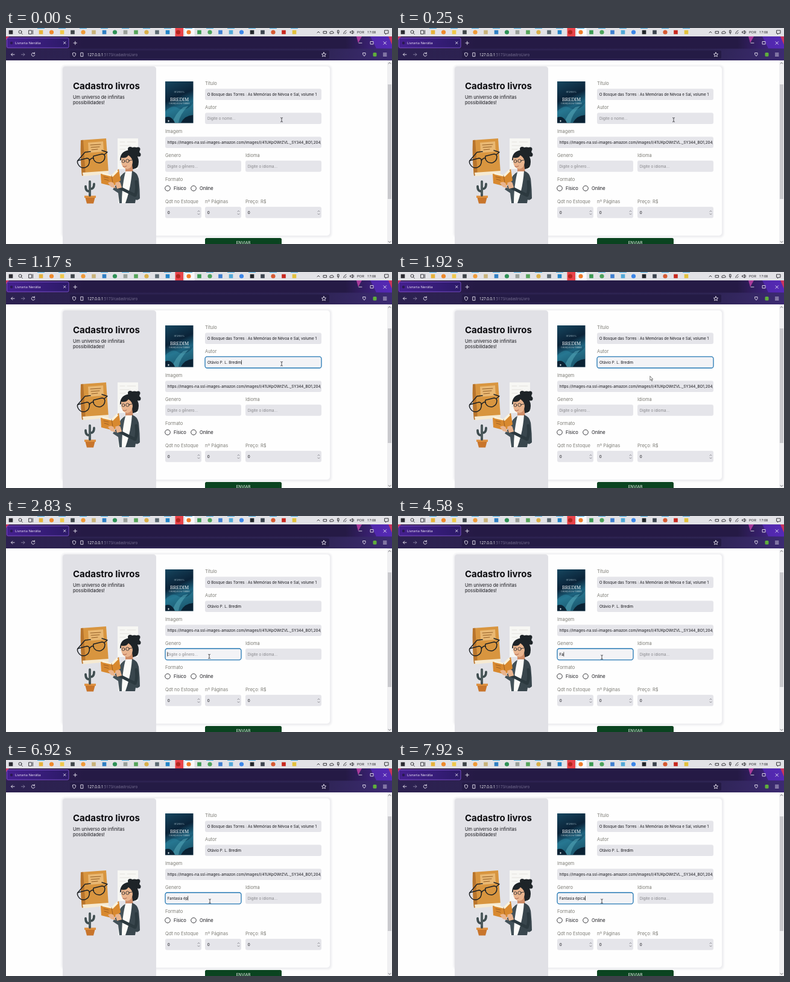
Write an HTML page that moves like this. It is 640 px wide and 360 px high and loops after 8000 ms.

```html
<!DOCTYPE html>
<html lang="pt">
<head>
<meta charset="utf-8">
<title>Cadastro livros</title>
<style>
html, body { margin: 0; width: 100%; height: 100%; overflow: hidden; background: #fefefe; }
svg { display: block; width: 640px; height: 360px; }
text { font-family: Inter, sans-serif; font-size: 6.25px; fill: #15151a; white-space: pre; }
.ui { font-family: "Open Sans", sans-serif; font-size: 6.1px; }
.label { font-size: 7.5px; fill: #7c7b74; }
.body { font-size: 7.5px; }
.hint { fill: #86868a; }
.box { fill: #e5e5ea; }
.line { fill: none; stroke-linecap: round; stroke-linejoin: round; }
</style>
</head>
<body>
<svg viewBox="0 0 640 360">
  <defs>
    <linearGradient id="tabs"><stop stop-color="#3a1d5c"/><stop offset=".2" stop-color="#251a45"/><stop offset=".88" stop-color="#251a45"/><stop offset="1" stop-color="#4a2596"/></linearGradient>
    <linearGradient id="tab"><stop stop-color="#45208f"/><stop offset="1" stop-color="#2c1a68"/></linearGradient>
    <linearGradient id="nav"><stop stop-color="#2c2150"/><stop offset=".8" stop-color="#2d2452"/><stop offset="1" stop-color="#3c2a72"/></linearGradient>
    <linearGradient id="cover" x2=".3" y2="1"><stop stop-color="#16465f"/><stop offset=".45" stop-color="#0b2338"/><stop offset=".7" stop-color="#1d6480"/><stop offset="1" stop-color="#0a2b40"/></linearGradient>
    <filter id="soft" x="-10%" y="-10%" width="120%" height="120%"><feGaussianBlur stdDeviation="1.8"/></filter>
  </defs>

  <!-- page -->
  <rect width="640" height="360" fill="#fefefe"/>
  <rect x="92" y="62" width="448" height="287" rx="6" fill="#ededf0" filter="url(#soft)"/>
  <rect x="94" y="64" width="443" height="282" rx="5" fill="#fefefe"/>
  <path d="M94 360V69q0-5 5-5H244q5 0 5 5V360Z" fill="#e1e1e6"/>
  <text x="111" y="101.8" style="font-size:15px;font-weight:700;fill:#0c0c10">Cadastro livros</text>
  <text class="body" x="111" y="117.6">Um universo de infinitas</text>
  <text class="body" x="111" y="126.8">possibilidades!</text>

  <!-- reader -->
  <g id="art">
    <path d="M185 184h34v51h-34Z" fill="#f7f7f4"/>
    <path class="line" d="M189 190h8m4 0h14m-26 6h18m-18 6h9m-9 22h6" stroke="#e2e0dc" stroke-width="1"/>
    <path d="M124 187l42-3 4 58-44 4q-3-28-2-59Z" fill="#d8953f"/>
    <path d="M124 187l4-.3 4 59-6 .5q-3-28-2-59Z" fill="#b8742c"/>
    <path d="M127 241l43-3v5l-42 4Z" fill="#f6ead2"/>
    <path d="M136 191l25-2 1 17-25 2Z" fill="#e9b873"/>
    <path class="line" d="M140 195l17-1m-16 5l14-1m-13 5l10-1" stroke="#8f5a24" stroke-width="1"/>
    <g class="line" stroke="#1c2024" stroke-width="1.5">
      <path d="M119 221l15-4q4 0 4.500 4 0 9-7 11.500-8 2-12-5.500-2-4-.5-6ZM145 213.500l14-3.500q4 0 5 4 0 8-7 10.500-8 1.500-11.500-5-1.500-4-.5-6Z"/>
      <path d="M138 221q4-5 7-4M119 221l12-14 9-1M163 211l5-4-9-3"/>
    </g>
    <path d="M131 281h17l-3 11.500h-11Z" fill="#c8752c"/>
    <path d="M130 279.500h19v3.500h-19Z" fill="#dd8f3e"/>
    <path class="line" d="M139 279v-23M139 272q-7 1-7-8M139 268q7 1 7-8" stroke="#3f4d50" stroke-width="3.800"/>
    <path class="line" d="M139 277v-20" stroke="#6d7b7c" stroke-width=".7"/>
    <!-- hair, head -->
    <g fill="#1e2428">
      <circle cx="213" cy="207" r="8.500"/><circle cx="206" cy="202" r="4"/><circle cx="219" cy="202" r="3.500"/><circle cx="220" cy="211" r="3.500"/>
      <path d="M189 221q0-14 12-17 14-1 17 10 4 9 0 18-7 6-14 1l-9-16Z"/>
    </g>
    <path d="M198 229l11-2 2 14q-7 7-13 0Z" fill="#cf8d68"/>
    <path d="M191 216q8 2 12-4 7 5 7 12-1 10-9 11-9-1-10-12Z" fill="#e9b48e"/>
    <g class="line" stroke="#1e2428" stroke-width=".8">
      <circle cx="194.500" cy="222" r="2.400"/><circle cx="201.500" cy="221.500" r="2.700"/><path d="M204 221l5-1"/>
      <path d="M194 230.500q3 2 6-.5" stroke="#9b4e3d"/>
    </g>
    <!-- clothes, open book -->
    <path d="M188 246l11-7 12 0 5 15-4 38h-26Z" fill="#fbfbf8"/>
    <path d="M209 238q9 3 11 13 2 17 2 33-4 4-7 2l-1 6h-16q9-25 11-54Z" fill="#39464d"/>
    <path d="M198 240q-9 4-11 15l-10 14 9 6 2 17h4q0-28 6-52Z" fill="#435158"/>
    <path class="line" d="M216 256q2 16-2 23l-26-13" stroke="#2c393f" stroke-width="5"/>
    <path d="M157 243l18 3 12-11 3 19-12 10-20-5Z" fill="#d8892f"/>
    <path d="M160 241l15 4 9-9 2 3-9 9-17-4Z" fill="#faf2dc"/>
    <path class="line" d="M175 246l3 17M162 248l8 2m-7 2l7 2" stroke="#8f5420" stroke-width=".8"/>
    <path d="M181 258q8-4 9 1l2 7-8 2ZM169 258q5-3 9 0l4 9-8-2Z" fill="#e9b48e"/>
  </g>

  <!-- book cover -->
  <g>
    <rect x="264" y="89" width="46.500" height="69.500" fill="url(#cover)"/>
    <path d="M264 139q12-13 22-5 14 6 24-9v33h-46Z" fill="#2f87a0" opacity=".55"/>
    <path d="M276 158q4-15 18-26l8-2q-14 14-16 28Z" fill="#5cb0c0" opacity=".5"/>
    <path d="M264 149q10-4 16 9h-16ZM290 158q6-12 20-13v13Z" fill="#0a2234"/>
    <g text-anchor="middle">
      <text x="287.500" y="107.800" style="font:3px 'Liberation Serif',serif;fill:#b9d0da">OTÁVIO P. L.</text>
      <text x="287.500" y="122" style="font:8px 'Liberation Serif',serif;fill:#f6f8fa">BREDIM</text>
      <text x="287.500" y="127.200" style="font:3px 'Liberation Serif',serif;fill:#d5e0e6">O BOSQUE DAS TORRES</text>
    </g>
    <path d="M268 155h3m-1.500-1.500v3" stroke="#dfe8ec" stroke-width=".9"/>
  </g>

  <g id="form"></g>
  <rect x="330" y="350" width="127" height="20" rx="2.500" fill="#0a4420"/>
  <text x="393.500" y="360.300" text-anchor="middle" style="font-size:6.5px;fill:#f2f4f0">ENVIAR</text>

  <!-- live parts -->
  <rect id="ring" height="18.800" rx="3.500" fill="#f3f3f6" stroke="#2277b4" stroke-width="1.300"/>
  <text id="author" x="334" y="153.200"></text>
  <text id="genre" x="267.500" y="233"></text>
  <rect id="caret" width=".7" height="7.500" fill="#111"/>

  <!-- scrollbar -->
  <rect x="632" y="54" width="8" height="306" fill="#f0f0f2"/>
  <rect x="633" y="94" width="6" height="191" fill="#c9c9cd"/>
  <path class="line" d="M634 59.500l2-2 2 2M634 355.500l2 2 2-2" stroke="#55555a" stroke-width=".9"/>

  <!-- browser -->
  <rect y="14" width="640" height="21" fill="url(#tabs)"/>
  <path d="M581 14h9l-6 11Z" fill="#a83a9a"/>
  <path d="M604 14h30l6 12v8h-26Z" fill="#5a2cc4" opacity=".7"/>
  <path d="M634 14h6v14ZM0 14h5l-5 6Z" fill="#c8355e"/>
  <rect y="34.500" width="640" height="19.500" fill="url(#nav)"/>
  <rect x="1.500" y="16.500" width="102.500" height="16.500" rx="2" fill="url(#tab)" stroke="#8a5be0" stroke-width=".8"/>
  <rect x="106" y="37.500" width="430" height="13.500" rx="2" fill="#241b45"/>
  <circle cx="9" cy="25" r="2.200" fill="#2a1a52"/>
  <text class="ui" x="15" y="27.200" style="fill:#f5f0fa">Livraria Nerália</text>
  <text class="ui" x="135" y="46.600" style="font-size:6.2px;fill:#fff">127.0.0.1<tspan fill="#7d7698">:5173/cadastroLivro</tspan></text>
  <g class="line" stroke="#ece8f4" stroke-width=".9">
    <path d="M95.500 23l3.500 3.500m0-3.500l-3.500 3.500M112 25h5.500m-2.750-2.750v5.500"/>
    <path d="M14 44.200H8.500l2.300-2.300m-2.300 2.300l2.300 2.300"/>
    <path d="M25.500 44.200h5.500l-2.300-2.300m2.300 2.300l-2.300 2.300" stroke="#8d86a6"/>
    <path d="M47.300 42.500a2.800 2.800 0 1 0 .5 2.500m-.4-4.200v2h-2"/>
    <path d="M113 41.300l2.700 1q0 4-2.700 5.500-2.700-1.500-2.700-5.500ZM124.200 41.300h3.600v6h-3.600Z"/>
    <path d="M527 40.700l1.100 2.300 2.500.3-1.800 1.800.5 2.500-2.300-1.200-2.300 1.200.5-2.500-1.800-1.800 2.500-.3Z"/>
    <path d="M585 25h5M604.500 22.500h4.500v4.500h-4.500ZM626 22.800l4.500 4.500m0-4.500l-4.500 4.500"/>
    <path d="M592 41.500h4v3l-2 2.500-2-2.500ZM625.500 42h5.500m-5.500 2.300h5.500m-5.500 2.300h5.500"/>
  </g>
  <rect x="608.500" y="41" width="6" height="6.500" rx="1.500" fill="#5fae3c"/>

  <!-- taskbar -->
  <rect width="640" height="14" fill="#e2e2e6"/>
  <rect x="280.500" width="13.500" height="14" fill="#e8434a"/>
  <rect x="296.500" width="16" height="14" fill="#fafafc"/>
  <g id="icons"></g>
  <g class="line" stroke="#26262b" stroke-width=".9">
    <circle cx="23.500" cy="6.500" r="2.500"/>
    <path d="M25.300 8.400l2 2M38 4h4.500v6H38ZM44.500 4v6"/>
    <path d="M516 8l2-2 2 2M526.500 5.500h5v3.500h-5ZM537 9q-1-3 2-3 2-2 4 1 1 2-1 2ZM550 4h2v4h-2ZM551 8v2M560 9.500q0-4 4-5M562.500 9.500l1.500-2M571 6h1.500l2-2v6l-2-2H571ZM576 5q1.500 2 0 4M628 4h6v5h-3l-1.500 1.500V9H628Z"/>
  </g>
  <text class="ui" x="582" y="9.200" style="font-size:5.9px">POR</text>
  <text class="ui" x="599" y="9.200" style="font-size:5.6px">17:08</text>

  <g id="beam" class="line" stroke="#2b2b30" stroke-width=".8"><path d="M-1.500-3.500q1.500 0 1.500 1 0-1 1.500-1M0-2.500v5M-1.500 3.500q1.500 0 1.500-1 0 1 1.500 1"/></g>
  <path id="arrow" d="M0 0v7l1.600-1.500 1.200 2.700 1.100-.5-1.200-2.600h2.200Z" fill="#fff" stroke="#222" stroke-width=".6"/>
</svg>
<script>
const $ = id => document.getElementById(id);

// [x, y, width, label, value, placeholder]
const fields = [
  [330, 101.3, 193, "Título", "O Bosque das Torres : As Memórias de Névoa e Sal, volume 1"],
  [330, 141.2, 193, "Autor"],
  [264, 181.2, 259, "Imagem", "https://images-na.ssl-images-amazon.com/images/I/41UKpOWrZVL._SY344_BO1,204,"],
  [264, 221, 126, "Genero"],
  [397, 221, 126, "Idioma", "", "Digite o idioma..."],
  [264, 298, 60, "Qdt no Estoque", 0],
  [330, 298, 60, "nº Páginas", 0],
  [397, 298, 126, "Preço: R$", 0]
];
const label = (x, y, s, cls = "label") => `<text class="${cls}" x="${x}" y="${y}">${s}</text>`;
let form = "";
fields.forEach(([x, y, w, name, value = "", hint], i) => {
  form += label(x, y - 6.4, name) +
    `<rect class="box" x="${x}" y="${y}" width="${w}" height="18.8" rx="3"/>` +
    `<svg x="${x}" y="${y}" width="${w - 1}" height="19">${label(3.7, 12, hint || value, hint ? "hint" : "")}</svg>`;
  if (i > 4) form += `<path class="line" d="M${x + w - 6} ${y + 8}l1.500-1.500 1.500 1.500m-3 3.500l1.500 1.500 1.500-1.500" stroke="#5f5f66" stroke-width=".7"/>`;
});
form += label(264, 254.6, "Formato");
[[268, "Físico"], [311, "Online"]].forEach(([x, s]) => {
  form += `<circle cx="${x}" cy="267.2" r="4.300" fill="#fefefe" stroke="#3a3a3e" stroke-width="1"/>` + label(x + 10, 270, s, "body");
});
$("form").innerHTML = form;

// taskbar apps: evenly spaced plain marks
const tints = "#e7b43a #ee8a2c #f0c94a #41474b #ef9b38 #c9b37a #2f7fc4 #2f9156 #9aa09a #57a55a #d8b04a #5d6b73 #2284c8 #b3261e #ef7d2a #3b9a52 #4ca35a #3f7fd0 #52a9d8 #3c86e8 #22262a #3d4550 #d65a32 #c8281f #e3c23c".split(" ");
const mark = (x, c, round) => round
  ? `<circle cx="${x}" cy="7" r="3.600" fill="${c}"/>`
  : `<rect x="${x - 3.3}" y="3.700" width="6.600" height="6.600" fill="${c}"/>`;
$("icons").innerHTML = mark(8, "#2c2c32") + tints.map((c, i) => {
  const x = 58 + i * 17.5;
  return mark(x, c, i % 3 == 1 || i == 14) +
    (i % 2 ? "" : `<rect x="${x - 6}" width="12" height="1" fill="#3fa6dc"/>`);
}).join("");

const FOCUS_AUTHOR = 670, PASTE = 1000, FOCUS_GENRE = 2670;
const genre = "Fantasia épica";
const keys = [4170, 4500, 4670, 4830, 5000, 5170, 5250, 5420, 6580, 6670, 6920, 7250, 7670, 7830];

const easeIn = k => k * k, easeOut = k => 1 - (1 - k) * (1 - k);
// [start, end, dx, dy, ease]
const moves = [
  [1620, 1920, -40, 21, easeIn],
  [1920, 2580, -80, 60, easeOut],
  [3170, 3420, 1, 1.3, easeOut]
];

function mouse(t) {
  let x = 457, y = 153;
  for (const [from, to, dx, dy, ease] of moves) {
    const k = ease(Math.min(1, Math.max(0, (t - from) / (to - from))));
    x += dx * k;
    y += dy * k;
  }
  return [x, y];
}

const show = (el, on) => el.setAttribute("visibility", on ? "visible" : "hidden");

function draw(ms) {
  const t = Math.floor((ms % 8000 + 5) / (1000 / 12)) * 1000 / 12;
  const at = time => t >= time - 5;
  const inGenre = at(FOCUS_GENRE), focused = at(FOCUS_AUTHOR);
  const typed = keys.filter(at).length;

  $("author").textContent = at(PASTE) ? "Otávio P. L. Bredim" : "Digite o nome...";
  $("author").setAttribute("class", at(PASTE) ? "" : "hint");
  $("genre").textContent = typed ? genre.slice(0, typed) : "Digite o gênero...";
  $("genre").setAttribute("class", typed ? "" : "hint");

  const [x, y, w] = fields[inGenre ? 3 : 1];
  $("ring").setAttribute("x", x);
  $("ring").setAttribute("y", y);
  $("ring").setAttribute("width", w);
  show($("ring"), focused);

  const last = Math.max(...[FOCUS_AUTHOR, PASTE, FOCUS_GENRE, ...keys].filter(at));
  const filled = inGenre ? typed : at(PASTE);
  const text = $(inGenre ? "genre" : "author");
  $("caret").setAttribute("x", +text.getAttribute("x") + (filled ? text.getComputedTextLength() : 0));
  $("caret").setAttribute("y", y + 5.6);
  show($("caret"), focused && Math.floor((t - last + 5) / 500) % 2 == 0);

  const [mx, my] = mouse(t);
  const over = fields.some(([a, b, c]) => mx > a && mx < a + c && my > b && my < b + 19);
  for (const id of ["beam", "arrow"]) {
    $(id).setAttribute("transform", `translate(${mx} ${my})`);
    show($(id), over == (id == "beam"));
  }
}

function loop() {
  draw(performance.now());
  requestAnimationFrame(loop);
}
loop();
</script>
</body>
</html>
```
